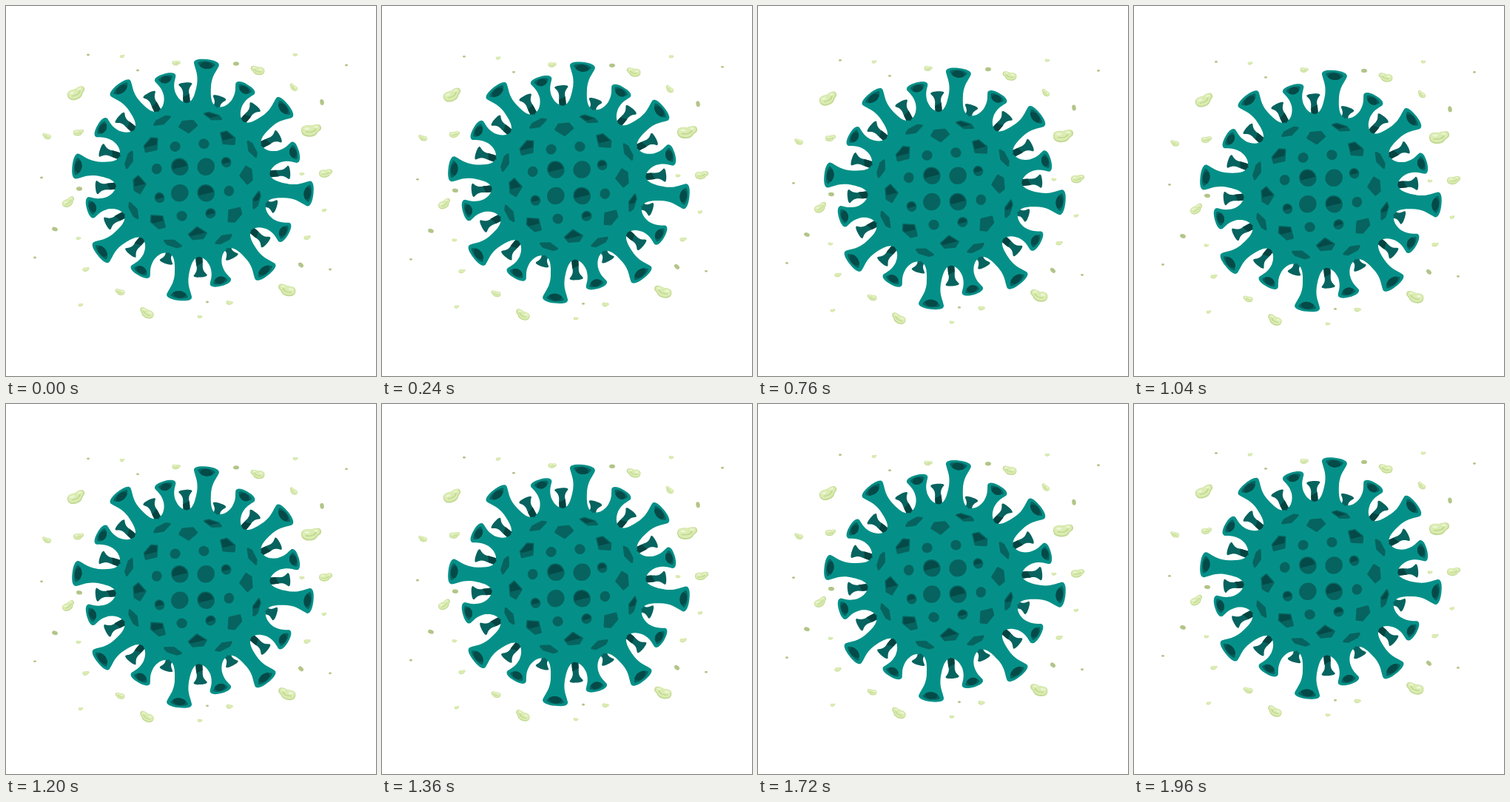
An HTML page with a canvas for the animation above (2000 ms loop, 500x500 px).

```html
<!DOCTYPE html>
<html lang="en">
<head>
<meta charset="utf-8">
<title>Floating virus</title>
<style>
  html, body { margin: 0; width: 100%; height: 100%; overflow: hidden; background: #fff; }
  canvas { display: block; width: 500px; height: 500px; }
</style>
</head>
<body>
<canvas id="stage" width="500" height="500"></canvas>
<script>
const ctx = document.getElementById('stage').getContext('2d');
const LOOP = 2000, STEP = 40;
const BODY_TRAVEL = 15.6, BIT_TRAVEL = 9.8;
const CX = 252.5, CY = 235, RADIUS = 103;
const TEAL = '#049088', SPOT = '#07635f', DEEP = '#044a48', SHADE = '#054341';
const PALE = '#dbecb1', PALE_EDGE = '#c1d892', PALE_GLOW = '#ecf5d6', GREY = '#b2c588';
const rad = deg => deg * Math.PI / 180;

// Spots sit on rings; depth is their radial half size, width the tangential one
const rings = [
  { count: 4, r: 25, from: 45, depth: 12, width: 11.5, round: true, shaded: [0, 2] },
  { count: 8, r: 51, from: 17, depth: 6.8, width: 7.2, round: true, shaded: [1, 3, 7] },
  { count: 8, r: 73, from: -5, depth: 10, width: 13, shaded: [2, 3, 4, 5, 7] },
  { count: 8, r: 90, from: 17.5, depth: 5.5, width: 13, shaded: [0, 6] }
];
const shortBack = [1, 3, 5, 13];

// x, y, width, turn; a negative width mirrors the blob
const blobs = [
  [95, 118, 25, -18], [340, 87, -19, 5], [388.5, 110, -12, 30], [412.5, 168, 27, 0],
  [432, 226, 18, 0], [379.5, 384, -24, 10], [190, 415, -20, 20], [154, 386.5, -13, 5],
  [84.5, 265, 18, -25], [55, 176, -12, 10], [98, 171, 14, 0], [230, 77, 11, 10]
];
const crumbs = [
  [108, 356], [302, 401], [407, 313], [400, 227], [430, 276],
  [98, 314], [101, 404], [262, 420], [157, 68], [391, 66]
];
const dots = [[311, 78], [99, 247], [66, 301.5], [398.5, 350], [427, 130]];
const specks = [[178, 87], [272, 400], [111, 66], [460, 80], [48, 232], [39, 340], [438, 356]];

function placed(x, y, angle, draw) {
  ctx.save();
  ctx.translate(x, y);
  ctx.rotate(angle);
  draw();
  ctx.restore();
}

function ellipse(x, y, rx, ry, fill) {
  ctx.beginPath();
  ctx.ellipse(x, y, rx, ry, 0, 0, Math.PI * 2);
  ctx.fillStyle = fill;
  ctx.fill();
}

// One side of a trumpet along +x, mirrored into a closed outline
function trumpet(tip, head, neck, foot, flare, lip) {
  const p = new Path2D(), n = tip - flare;
  for (const s of [-1, 1]) {
    p.moveTo(95, 0);
    p.lineTo(95, s * foot);
    p.lineTo(102, s * foot);
    p.bezierCurveTo(105, s * (foot + neck) * 0.45, 112, s * (neck + 1), n, s * neck);
    p.bezierCurveTo(tip - flare * 0.6, s * neck, tip - flare * 0.47, s * (head - 3),
      tip - lip, s * head);
    p.bezierCurveTo(tip - lip * 0.3, s * (head + 1), tip, s * head * 0.6, tip, 0);
    p.closePath();
  }
  return p;
}

function holePath(tip, w) {
  const p = new Path2D(), r = tip - 6;
  p.moveTo(r, -w);
  p.bezierCurveTo(r + 4.5, -w * 0.7, r + 4.5, w * 0.7, r, w);
  p.bezierCurveTo(r - 5, w * 0.8, r - 7, w * 0.3, r - 7, 0);
  p.bezierCurveTo(r - 7, -w * 0.3, r - 5, -w * 0.8, r, -w);
  return p;
}

function backSpike(i) {
  const tip = shortBack.includes(i) ? 119 : 132;
  placed(0, 0, rad(-4.5 + 22.5 * i), () => {
    ctx.clip(trumpet(tip, 9, 4, 5, 14, 3));
    ctx.fillStyle = SPOT;
    ctx.fillRect(90, -12, 60, 24);
    ctx.fillStyle = SHADE;
    ctx.beginPath();
    ctx.moveTo(90, -6);
    ctx.lineTo(tip - 20, -6);
    ctx.lineTo(tip - 15, 6);
    ctx.lineTo(90, 6);
    ctx.fill();
  });
}

function frontSpike(i) {
  const long = i % 2 === 0;
  const tip = long ? 164 : 148.5;
  placed(0, 0, rad((long ? 6.7 : 7.3) + 22.5 * i), () => {
    ctx.fillStyle = TEAL;
    ctx.fill(long ? trumpet(tip, 17, 9.5, 20, 34, 7) : trumpet(tip, 14.5, 8, 20, 28, 7));
    ctx.clip(holePath(tip, long ? 12 : 10));
    ctx.fillStyle = SPOT;
    ctx.fillRect(tip - 20, -20, 30, 40);
    ellipse(tip - 9, 0, 5.5, long ? 8.5 : 7, DEEP);
  });
}

// Blunt triangle whose tip points at the centre
function shield(depth, width) {
  const p = new Path2D();
  p.moveTo(-depth, 0);
  p.lineTo(0, -width);
  p.lineTo(depth * 0.75, -width * 0.6);
  p.lineTo(depth * 0.75, width * 0.6);
  p.lineTo(0, width);
  p.closePath();
  return p;
}

function drawRing({ count, r, from, depth, width, round, shaded }) {
  for (let i = 0; i < count; i++) {
    const angle = rad(from + i * 360 / count);
    placed(r * Math.cos(angle), r * Math.sin(angle), angle, () => {
      let path = shield(depth - 1.5, width - 1.5);
      if (round) {
        path = new Path2D();
        path.ellipse(0, 0, depth - 1.5, width - 1.5, 0, 0, Math.PI * 2);
      }
      ctx.fillStyle = ctx.strokeStyle = SPOT;
      ctx.fill(path);
      ctx.stroke(path);
      if (!shaded.includes(i)) return;
      ctx.clip(path);
      ctx.rotate(-angle - 0.25);
      ctx.fillStyle = DEEP;
      ctx.fillRect(-30, -30, 60, 31);
    });
  }
}

const bean = new Path2D(
  'M-1 0C-1-.8-.4-.75 0-.7C.4-.9 1-1.1 1-.35C1 .1 .7 .1 .6 .4C.4 1-.3 1.05-.6 .85C-.9 .7-1 .4-1 0Z');

function blob(x, y, w, turn) {
  placed(x, y, rad(turn), () => {
    ctx.scale(w / 2, Math.abs(w) * 0.34);
    ctx.fillStyle = PALE_EDGE;
    ctx.fill(bean);
    ctx.translate(-0.02, -0.08);
    ctx.scale(0.9, 0.86);
    ctx.fillStyle = PALE;
    ctx.fill(bean);
    if (Math.abs(w) < 11) return;
    ctx.beginPath();
    ctx.moveTo(-0.6, 0.35);
    ctx.quadraticCurveTo(0.3, 0.6, 0.55, -0.2);
    ctx.lineWidth = 0.2;
    ctx.strokeStyle = PALE_EDGE;
    ctx.stroke();
    ellipse(-0.45, -0.2, 0.3, 0.2, PALE_GLOW);
    ellipse(0.55, -0.5, 0.25, 0.15, PALE_GLOW);
  });
}

function bits() {
  for (const b of blobs) blob(...b);
  crumbs.forEach(([x, y], i) => blob(x, y, i < 3 ? 9 : 6.5, i % 2 * 15));
  // Each dot is turned a little further than the one before
  dots.forEach(([x, y], i) => placed(x, y, rad(i * i * 5), () => ellipse(0, 0, 4, 2.7, GREY)));
  for (const [x, y] of specks) ellipse(x, y, 2, 1.4, GREY);
}

function virus() {
  for (let i = 0; i < 16; i++) backSpike(i);
  ellipse(0, 0, RADIUS, RADIUS, TEAL);
  for (let i = 0; i < 16; i++) frontSpike(i);
  ctx.lineWidth = 3;
  ctx.lineJoin = 'round';
  rings.forEach(drawRing);
}

function render(now) {
  const t = Math.floor((now % LOOP) / STEP) * STEP / LOOP;
  const drop = 1 - Math.abs(1 - 2 * t);
  ctx.clearRect(0, 0, 500, 500);
  placed(0, BIT_TRAVEL * drop, 0, bits);
  placed(CX, CY + BODY_TRAVEL * drop, 0, virus);
}

let start;
function tick(now) {
  start ??= now;
  render(now - start);
  requestAnimationFrame(tick);
}
render(0);
requestAnimationFrame(tick);
</script>
</body>
</html>
```
